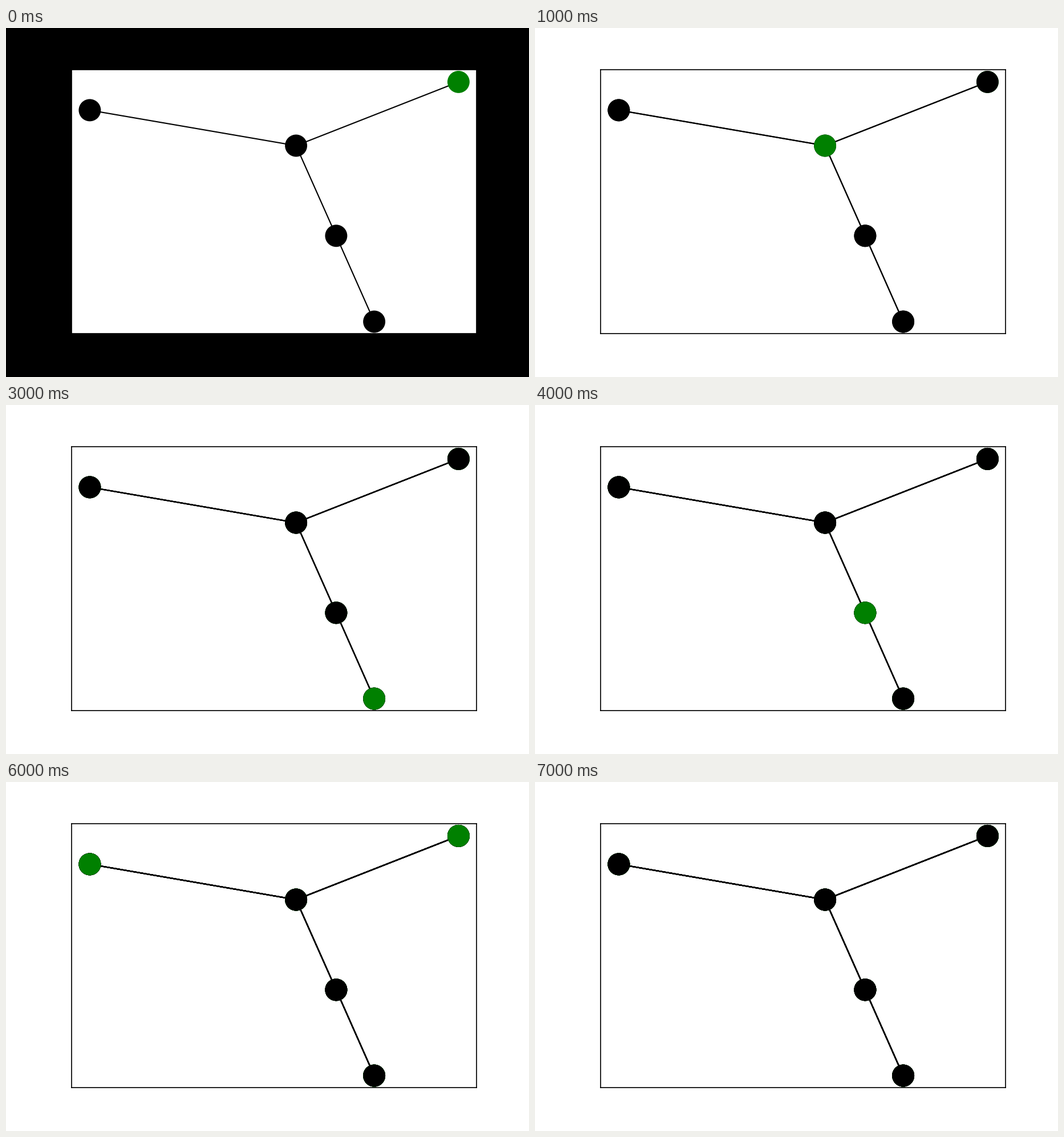
A matplotlib script that plays this animation: 917x611 px, repeating every 9 s.

```python
import matplotlib.pyplot as plt
from matplotlib.animation import FuncAnimation
from matplotlib.collections import LineCollection

W, H, DPI = 917, 611, 152.8
LEFT, RIGHT, BOTTOM, TOP = 0.125, 0.9, 0.125, 0.88

# node centres in pixels, y pointing down
POS = [(793.4, 94.4), (508.6, 206.0), (146.9, 143.9), (578.9, 363.8), (645.6, 514.1)]
EDGES = [(0, 1), (1, 2), (1, 3), (3, 4)]
STEPS = 8


def neighbours(n):
    return [b if a == n else a for a, b in EDGES if n in (a, b)]


def spread(lit):
    """A node lights up when exactly one neighbour was lit."""
    return {n for n in range(len(POS)) if sum(m in lit for m in neighbours(n)) == 1}


fig = plt.figure(figsize=((W + 0.01) / DPI, (H + 0.01) / DPI), dpi=DPI)
ax = fig.add_axes([LEFT, BOTTOM, RIGHT - LEFT, TOP - BOTTOM])
ax.set(xlim=(LEFT * W, RIGHT * W), ylim=((1 - BOTTOM) * H, (1 - TOP) * H),
       xticks=[], yticks=[])

# each step is painted over the previous ones
layers = []
lit = {0}
for _ in range(STEPS):
    edges = LineCollection([(POS[a], POS[b]) for a, b in EDGES],
                           colors="black", linewidths=1, zorder=1)
    ax.add_collection(edges, autolim=False)
    colors = ["green" if n in lit else "black" for n in range(len(POS))]
    nodes = ax.scatter(*zip(*POS), s=300, c=colors, linewidths=1, zorder=2)
    layers.append((edges, nodes))
    lit = spread(lit)


def update(i):
    fig.set_facecolor("black" if i == 0 else "white")
    for k, layer in enumerate(layers):
        for artist in layer:
            artist.set_visible(k <= i)
    return []


anim = FuncAnimation(fig, update, frames=STEPS + 1, init_func=lambda: update(0),
                     interval=1000, repeat=True, repeat_delay=0, blit=False)
plt.show()
```
